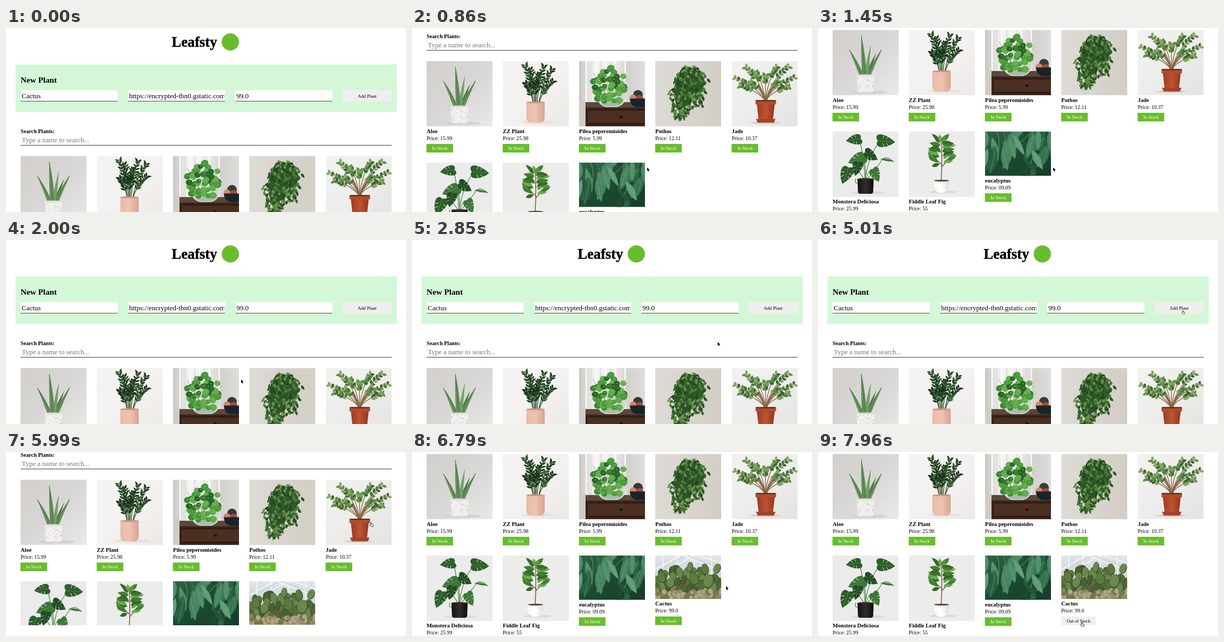
Recreate the animation shown at these times as an HTML page. Size 740 by 343 pixels, loop 8000 ms.

```html
<!DOCTYPE html>
<html lang="en">
<head>
<meta charset="utf-8">
<title>Plant shop</title>
<style>
  html, body { margin: 0; width: 100%; height: 100%; overflow: hidden; background: #fff; }
  #stage { display: block; width: 740px; height: 343px; }
  text { font-family: "Liberation Serif", "Times New Roman", serif; white-space: pre; }
</style>
</head>
<body>
<svg id="stage" viewBox="0 0 740 343"></svg>
<script>
const LOOP = 8000;
const GREEN = '#68bd2d';

// ---------- drawing helpers ----------
let seed = 1;
const rnd = (a = 0, b = 1) => {
  seed = (seed * 16807) % 2147483647;
  return a + (b - a) * seed / 2147483647;
};
const pick = list => list[Math.floor(rnd(0, list.length))];
const n1 = v => +v.toFixed(1);
const repeat = (n, fn) => Array.from({ length: n }, (_, i) => fn(i)).join('');

const rect = (x, y, w, h, fill, rx = 0) =>
  `<rect x="${x}" y="${y}" width="${w}" height="${h}" fill="${fill}" rx="${rx}"/>`;
const oval = (x, y, rx, ry, fill, a = 0) =>
  `<ellipse cx="${n1(x)}" cy="${n1(y)}" rx="${n1(rx)}" ry="${n1(ry)}" fill="${fill}" transform="rotate(${n1(a)} ${n1(x)} ${n1(y)})"/>`;
const path = (d, fill) => `<path d="${d}" fill="${fill}"/>`;
const line = (d, stroke, w = 1) => `<path d="${d}" fill="none" stroke="${stroke}" stroke-width="${w}"/>`;
const text = (x, y, size, str, fill = '#000', extra = '') =>
  `<text x="${x}" y="${y}" font-size="${size}" fill="${fill}" ${extra}>${str}</text>`;
const BOLD = 'font-weight="700"';
const MID = 'text-anchor="middle"';

let defs = '';
function grad(id, x2, y2, ...colors) {
  const stops = colors.map((c, i) => `<stop offset="${i / (colors.length - 1)}" stop-color="${c}"/>`).join('');
  defs += `<linearGradient id="${id}" x2="${x2}" y2="${y2}">${stops}</linearGradient>`;
  return `url(#${id})`;
}

const leaf = (x, y, a, l, w, fill) =>
  `<path transform="translate(${n1(x)} ${n1(y)}) rotate(${n1(a)})" d="M0 0Q${n1(l * .45)} ${n1(-w)} ${n1(l)} 0Q${n1(l * .45)} ${n1(w)} 0 0" fill="${fill}"/>`;

// curved tapering blade
function blade(x0, y0, x1, y1, w, fill) {
  const cx = x0 + (x1 - x0) * .4, cy = y0 + (y1 - y0) * .5;
  return path(`M${x0 - w} ${y0}Q${cx - w} ${cy} ${x1} ${y1}Q${cx + w} ${cy} ${x0 + w} ${y0}Z`, fill);
}

// bent stem with pairs of leaves
function frond(x0, y0, x1, y1, n, l, w, stem, colors, from = .35) {
  const cx = x0 + (x1 - x0) * .3, cy = y0 + (y1 - y0) * .65;
  let out = line(`M${x0} ${y0}Q${cx} ${cy} ${x1} ${y1}`, stem, 1.4);
  for (let i = 0; i <= n; i++) {
    const t = from + (1 - from) * i / n, u = 1 - t;
    const x = u * u * x0 + 2 * u * t * cx + t * t * x1;
    const y = u * u * y0 + 2 * u * t * cy + t * t * y1;
    const a = Math.atan2(u * (cy - y0) + t * (y1 - cy), u * (cx - x0) + t * (x1 - cx)) * 180 / Math.PI;
    for (const side of [-1, 1]) out += leaf(x, y, a + side * rnd(25, 60), l * rnd(.8, 1.15), w, pick(colors));
  }
  return out;
}

// ---------- plant pictures ----------
function aloe() {
  const g = ['#65905b', '#4b7549', '#76a06c'];
  return rect(0, 0, 122, 122, grad('ga', 1, 1, '#d2cfcc', '#d9d7d5', '#eae9e8')) +
    oval(66, 116, 34, 3, '#d3d0cf') +
    blade(55, 86, 41, 58, 2.5, g[1]) + blade(64, 86, 81, 42, 3, g[1]) +
    blade(54, 86, 30, 35, 4, g[0]) + blade(66, 86, 92, 35, 4, g[0]) +
    blade(62, 86, 71, 27, 3.5, g[2]) + blade(59, 86, 53, 9, 4.5, g[0]) +
    line('M59 82Q58 45 53 12M66 82Q76 60 90 37M53 80Q45 58 31 38', '#3f6639', .8) +
    path('M45 84H77L75.5 114Q75 116 73 116H49Q47 116 46.5 114Z', '#f1f0ee') +
    oval(61, 84.5, 16, 1.6, '#dcd9d5') +
    repeat(42, () => oval(rnd(47, 75), rnd(87, 115), .6, .5, pick(['#8e8a86', '#b9a18c', '#c7c4c0'])));
}

function zz() {
  const g = ['#1b361e', '#274927', '#152b18', '#345a2e'];
  const tips = [[42, 9], [52, 17], [66, 26], [76, 11], [91, 16], [92, 38], [43, 42], [60, 40]];
  return rect(0, 0, 122, 122, grad('gz', 1, 1, '#f5f3f1', '#f4f2f0', '#ece8e6')) +
    oval(66, 114, 30, 3, '#e6e0dd') +
    tips.map(([x, y]) => frond(60 + (x - 60) * .2, 80, x, y, 7, 9, 3.5, '#32552c', g, .36)).join('') +
    path('M43.5 77H77.5V106Q77 115 68 115H53Q44 115 43.5 106Z', grad('gp', 1, 0, '#e9bba9', '#efc3b2', '#d9a392')) +
    oval(60.5, 77, 17, 1.8, '#c99482');
}

function pilea() {
  const g = ['#4a9a3c', '#367a30', '#63ac4c', '#3c8a38', '#2a6429'];
  let out = rect(0, 0, 122, 122, grad('gl', 1, 0, '#c9c6c1', '#f4f4f3', '#eeeeec', '#d4d2cf', '#dfdddb')) +
    repeat(9, i => rect(12 + i * 9, 0, 2.5, 78, i % 2 ? '#dfdfdd' : '#fafafa')) +
    rect(0, 74, 12, 48, '#cfcbc6') +
    rect(12, 77, 110, 45, '#38231a') + rect(12, 77, 110, 10, '#5c463a') +
    rect(17, 92, 105, 24, '#4b2f20') + rect(17, 91, 105, 1.2, '#24140c') + rect(17, 116, 105, 1.5, '#24140c') +
    oval(78, 104, 3, 2.5, '#20130d') +
    path('M33 60H86Q88 82 70 86H50Q32 82 33 60Z', '#cdd7ce') + oval(60, 80, 18, 4.5, '#a9bbab');
  out += repeat(14, i => line(`M57 76Q${n1(56 + (i - 6) * 2)} 55 ${26 + i * 5} ${n1(22 + (i % 4) * 11)}`, '#6b9b52', .7));
  out += repeat(40, i => {
    const d = Math.sqrt((40 - i) / 40), a = i * 2.4;
    const x = 55 + 31 * d * Math.cos(a) + rnd(-3, 3), y = 46 + 33 * d * Math.sin(a) + rnd(-3, 3), r = rnd(4.5, 7.5);
    return oval(x, y, r, r * .86, pick(g), rnd(-40, 40)) + oval(x + 1, y - 1, 1, .8, '#9ccb84');
  });
  return out + oval(109, 63, 9, 9, '#343b35') + oval(100, 69, 6.5, 6.5, '#d88468') + oval(112, 69, 6.5, 5.5, '#a44b3c') +
    path('M94 70H122V86H106Q95 84 94 70Z', '#18242a');
}

function pothos() {
  const g = ['#2c5526', '#3c6b2e', '#527f3c', '#234820', '#6a9450'];
  let out = rect(0, 0, 122, 122, grad('gh', 1, 0, '#dedbd6', '#d8d4ce', '#d3cec6')) +
    line('M62 12Q66 60 38 112M66 20Q86 50 86 86M62 14Q50 70 56 96', '#55783f', .8) +
    path('M50 12Q85 8 92 40Q84 66 60 82Q42 94 40 84Q26 48 50 12Z', '#2f5429');
  out += repeat(230, i => {
    const y = 8 + 96 * i / 230;
    const c = 65 - 22 * Math.max(0, (y - 40) / 66);
    const h = y < 66 ? 31 * Math.sqrt(Math.min(1, (y - 4) / 26)) : 28 * (1 - (y - 66) / 46) + 3;
    return leaf(c + rnd(-h, h), y, rnd(25, 155), rnd(6, 11), rnd(3.5, 5.5), pick(g));
  });
  return out + repeat(14, i => leaf(84 + rnd(-5, 5), 52 + i * 2.2, rnd(30, 140), 8, 4.5, pick(g)));
}

function jade() {
  const g = ['#668f49', '#4a7a3a', '#82a661', '#3a6630'];
  const tips = [[8, 32], [17, 46], [28, 13], [46, 22], [63, 28], [82, 12], [104, 11], [114, 31], [104, 48], [36, 40], [86, 38]];
  return rect(0, 0, 122, 122, grad('gj', 1, 1, '#f2f2f1', '#ededec', '#e4e3e2')) +
    oval(62, 115, 28, 2.5, '#d5d2d1') +
    tips.map(([x, y]) => frond(62, 74, x, y, 4, 8.5, 5, '#8b7050', g, .62)).join('') +
    line('M61 76Q60 60 50 48M64 76Q66 62 78 48', '#856544', 3) +
    path('M46 76H80L76 112H50Z', grad('gt', 1, 0, '#9a3a22', '#bd5433', '#8f3720')) +
    rect(44, 73, 38, 8, '#b34b2d', 1) + rect(45, 73, 36, 2, '#4d2a1b') +
    path('M45 108H81L78 115H48Z', '#a34327');
}

function monstera() {
  const wall = '#ebebeb';
  const big = (x, y, a, s, c) =>
    `<g transform="translate(${x} ${y}) rotate(${a}) scale(${s / 20})">` +
    path('M1 0C-5 -8 6 -12 21 1C9 11 -4 8 1 0', c) + line('M1 0L19 .7', '#6b9a55', .4) +
    line('M7 -3L9 -9M11 -2.5L14 -7M7 3L9 8.5M11 2.5L14 6', wall, .6) + '</g>';
  const g = ['#2c5f2a', '#214c23', '#3b7736'];
  return rect(0, 0, 122, 122, wall) + oval(64, 114, 30, 3, '#dadada') +
    line('M60 92Q58 50 50 14M60 92Q66 45 86 20M61 92Q62 60 56 46M61 92Q80 70 92 52Q100 44 113 57M60 92Q44 62 28 69M61 92Q66 70 76 70M58 96Q38 100 43 88', '#4c7f42', 1.2) +
    big(53, 13, 168, 27, g[0]) + big(82, 17, 2, 32, g[0]) + big(59, 38, 28, 27, g[1]) +
    big(60, 46, 155, 32, g[2]) + big(30, 66, 108, 32, g[0]) + big(74, 69, 62, 26, g[2]) + big(48, 56, 100, 26, g[1]) +
    leaf(88, 51, 10, 26, 4, g[2]) +
    path('M46 88H76L75 113Q74 116 71 116H51Q48 116 47 113Z', grad('gb', 1, 0, '#111', '#2f2f2f', '#0c0c0c')) +
    oval(61, 88.5, 15, 1.8, '#3a2c22');
}

function fig() {
  const g = ['#55963d', '#427f32', '#70ab50', '#36692a'];
  return rect(0, 0, 122, 122, '#ececeb') + oval(64, 113, 26, 2.5, '#dadada') +
    line('M60 92Q62 50 60 14M61 66Q70 56 78 48M61 62Q50 52 42 46', '#7a6047', 1.6) +
    repeat(34, i => {
      const y = 60 - 44 * i / 34, side = i % 2 ? 1 : -1;
      const tilt = rnd(-22, 42) + i * .5, off = side * rnd(0, 13) * (1 - i / 40);
      return leaf(60 + off, y, side > 0 ? -tilt : 180 + tilt, rnd(15, 23), rnd(6, 9), pick(g));
    }) + leaf(60, 20, -105, 15, 7, g[2]) + leaf(60, 20, -60, 15, 7, g[0]) +
    path('M46 91H75Q75 108 68 114H54Q46 108 46 91Z', grad('gw', 1, 0, '#fbfbfb', '#fff', '#dddddc')) +
    oval(60.5, 91.5, 14, 1.8, '#5b4a3c');
}

function eucalyptus() {
  const g = ['#35704d', '#48855f', '#2a6042', '#5f9c77', '#4f8d67'];
  return rect(0, 0, 122, 83, grad('ge', 1, 1, '#2c6445', '#1b4a31', '#163c29')) +
    repeat(22, () => leaf(rnd(-5, 120), rnd(-15, 60), rnd(40, 150), rnd(28, 40), 11, pick(['#1c4a31', '#235539', '#2b6243']))) +
    line('M90 -2Q60 20 40 60M100 -2Q96 30 84 60M20 -2Q34 20 16 70', '#7f9a6a', 1) +
    repeat(27, () => {
      const x = rnd(0, 122), y = rnd(-20, 40), a = rnd(60, 145), l = rnd(34, 50);
      return leaf(x, y, a, l, rnd(9, 15), pick(g)) +
        `<path transform="translate(${n1(x)} ${n1(y)}) rotate(${n1(a)})" d="M0 0H${n1(l * .92)}" stroke="#8fbf9b" stroke-width=".4"/>`;
    });
}

function cactus() {
  defs += `<pattern id="dots" width="3.2" height="3.2" patternUnits="userSpaceOnUse" patternTransform="rotate(32)">${oval(1.6, 1.6, .45, .45, '#b9c18a')}</pattern>`;
  const g = ['#557539', '#48672f', '#64844a', '#3f5a2c'];
  const tan = ['#8e8a5c', '#a89a76', '#72794a', '#b5a587'];
  const pad = (x, y, rx, ry, a, c) =>
    oval(x + .5, y + .5, rx + .6, ry + .6, '#3a4a28', a) + oval(x, y, rx, ry, c, a) + oval(x, y, rx - .6, ry - .6, 'url(#dots)', a);
  return rect(0, 0, 122, 81, grad('gc', 0, 1, '#dfe5ea', '#cfd3d2', '#8f866a')) +
    line('M0 26L46 0M0 44L70 0M50 0L122 28M80 0L122 14M14 0V50M40 0V50M72 0V40M104 0V40', '#f6f8fa', 1.6) +
    line('M0 32L56 0M60 0L122 24', '#b8c1c8', .7) +
    repeat(18, i => oval(i * 7, rnd(48, 64), 7, 12, pick(['#6f6a48', '#59613a', '#857b5a']))) +
    repeat(42, i => pad(rnd(3, 119), 26 + i * .95, rnd(4.5, 7), rnd(7.5, 10.5), rnd(-35, 35), pick(g))) +
    pad(45, 32, 6, 10, -8, g[2]) + pad(64, 21, 5, 9, 6, g[2]) + pad(92, 25, 6, 10, -14, g[0]) + pad(114, 24, 6, 9, 20, g[2]) +
    pad(12, 40, 7, 10, -12, g[0]) + pad(98, 47, 9, 12, 10, g[2]) + pad(72, 43, 8, 11, -6, g[0]) + pad(28, 50, 7, 10, 14, g[2]) +
    repeat(38, i => oval(i * 3.3, rnd(66, 81), rnd(3, 5), rnd(4, 7), pick(tan), rnd(-25, 25)));
}

// ---------- page ----------
const COLS = [27, 168, 309, 450, 591.5];
const cards = [
  ['Aloe', '15.99', aloe], ['ZZ Plant', '25.98', zz], ['Pilea peperomioides', '5.99', pilea],
  ['Pothos', '12.11', pothos], ['Jade', '10.37', jade], ['Monstera Deliciosa', '25.99', monstera],
  ['Fiddle Leaf Fig', '55', fig], ['eucalyptus', '09.09', eucalyptus, 82.5], ['Cactus', '99.0', cactus, 81]
];

const button = (x, y, w, label, fill, ink) =>
  rect(x - .2, y, w, 16, fill) + text(x + w / 2, y + 11.1, 8.6, label, ink, MID);

function card([name, price, draw, h = 122], i) {
  const x = COLS[i % 5], y = i < 5 ? 238.5 : 428, b = y + h;
  seed = 77 + i * 991;
  const last = i === cards.length - 1;
  return `<g ${last ? 'id="added"' : ''}><svg x="${x}" y="${y}" width="122" height="${h}">${draw()}</svg>` +
    text(x, b + 12.4, 10.45, name, '#000', BOLD) +
    text(x, b + 25.4, 9.8, 'Price: ' + price) +
    `<g ${last ? 'id="inStock"' : ''}>${button(x, b + 32.6, 49.2, 'In Stock', GREEN, '#fff')}</g>` +
    (last ? `<g id="outStock">${button(x, b + 32.6, 64, 'Out of Stock', '#efefef', '#000')}</g>` : '') +
    '</g>';
}

const field = (x, str) =>
  `<svg x="${x}" y="115.7" width="179.7" height="21.3">${rect(0, 0, 180, 21.3, '#fff')}${rect(0, 20.2, 180, 1.1, '#555')}` +
  `<svg x="2" width="175.8" height="20">${text(0, 15, 13, str)}</svg></svg>`;

const page =
  text(306.5, 35, 26.5, 'Leafsty', '#000', 'font-weight="900" stroke="#000" stroke-width=".5"') +
  `<circle cx="415" cy="26" r="16" fill="${GREEN}"/>` +
  rect(17.5, 67.7, 705.5, 88.5, '#d4f7d8') +
  text(27, 102.3, 15.2, 'New Plant', '#000', BOLD) +
  field(27, 'Cactus') + field(225.7, 'https://encrypted-tbn0.gstatic.com/images') + field(424.2, '99.0') +
  rect(622.7, 115.7, 91, 21.3, '#efefef') + text(668, 129.6, 8.7, 'Add Plant', '#000', MID) +
  text(27, 195.5, 10.2, 'Search Plants:', '#000', BOLD) +
  text(29.3, 213.2, 12.9, 'Type a name to search...', '#757575') +
  rect(27, 218, 686.5, 1.2, '#555') +
  cards.map(card).join('');

const arrow = '<path d="M0 0V6.6L1.5 5.3 2.5 7.7 3.7 7.2 2.7 4.8H4.7Z" fill="#000" stroke="#fff" stroke-width=".5" paint-order="stroke"/>';
const hand = '<path d="M-.7 .5Q0 -.4 .7 .5V2.9L3.9 3.5Q4.6 3.7 4.4 4.6L3.8 7.5H.2L-2.3 4.6Q-2.1 3.7 -.7 4.6Z" fill="#fff" stroke="#000" stroke-width=".75"/>';

const stage = document.getElementById('stage');
stage.innerHTML = `<defs>${defs}</defs>${rect(0, 0, 740, 343, '#fff')}<g id="page">${page}</g>` +
  `<g id="blank">${rect(0, 323, 740, 20, '#fff')}</g>` +
  `<g id="cursor"><g id="arrow">${arrow}</g><g id="hand">${hand}</g></g>`;
const el = id => document.getElementById(id);
const show = (id, on) => el(id).setAttribute('visibility', on ? 'inherit' : 'hidden');

// ---------- timeline ----------
const scrolls = [
  [0, 0], [460, 8], [550, 30], [640, 62], [720, 102], [790, 143], [860, 177], [950, 204], [1050, 222], [1150, 231], [1250, 235],
  [1630, 212], [1700, 152], [1780, 84], [1850, 34], [1920, 8], [2000, 0],
  [5990, 187], [6110, 209], [6195, 223], [6280, 231], [6370, 235]
];
const ticks = (...runs) => runs.flatMap(([a, b, n]) => Array.from({ length: n }, (_, i) => a + (b - a) * i / (n - 1)));
const moves = [
  { at: ticks([180, 290, 3]), from: [420, 343], to: [435, 260] },
  { at: ticks([2180, 2380, 4], [2560, 2850, 5], [3040, 3720, 8]), from: [435, 260], to: [675, 131.5] },
  { at: ticks([6370, 6790, 5]), from: [675, 131.5], to: [581, 250] },
  { at: ticks([6950, 7360, 6], [7520, 7640, 3]), from: [581, 250], to: [488, 317.5] }
];
const ease = p => p * p * (3 - 2 * p);

function pointer(t) {
  let pos = null;
  for (const { at, from, to } of moves) {
    const done = at.filter(s => s <= t).length;
    if (!done) break;
    const p = ease(done / at.length);
    pos = from.map((v, i) => v + (to[i] - v) * p);
  }
  return pos;
}

const inside = ([x, y], l, t, r, b) => x >= l && x <= r && y >= t && y <= b;

function render(t) {
  const scroll = scrolls.filter(s => s[0] <= t).pop()[1];
  el('page').setAttribute('transform', `translate(0 ${-scroll})`);
  show('blank', t >= 5990 && t < 6110);
  show('added', t >= 5260);
  show('inStock', t < 7960);
  show('outStock', t >= 7960);

  const pos = pointer(t);
  show('cursor', pos);
  if (!pos) return;
  const over = inside(pos, 622, 116, 714, 137) || (t > 6950 && inside(pos, 450, 307, 499, 323));
  const size = t >= 5010 && t < 5260 ? .86 : 1;
  el('cursor').setAttribute('transform', `translate(${n1(pos[0])} ${n1(pos[1])}) scale(${size})`);
  show('arrow', !over);
  show('hand', over);
}

// visibility must follow the parent groups when a card or cursor is hidden
const start = performance.now();
function tick() {
  render((performance.now() - start) % LOOP);
  requestAnimationFrame(tick);
}
render(0);
requestAnimationFrame(tick);
</script>
</body>
</html>
```
